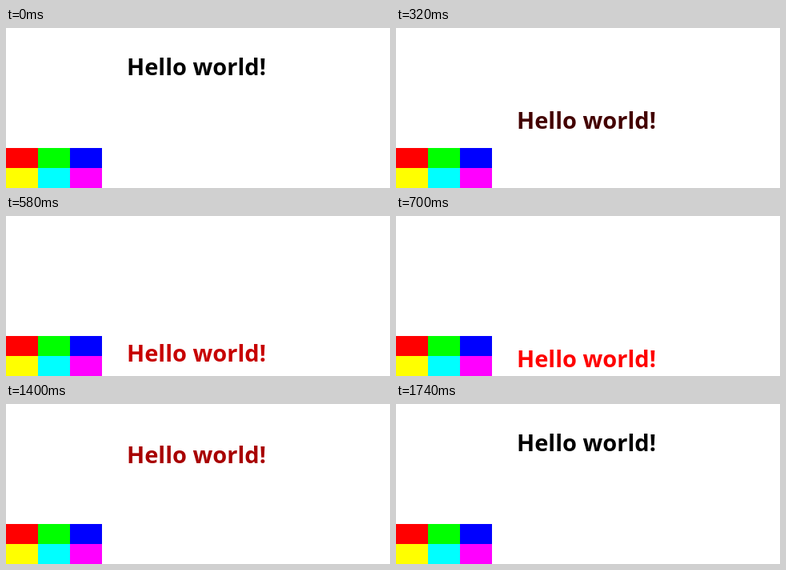
An HTML page with a canvas for the animation above (2.12 s loop, 480x200 px).

```html
<!DOCTYPE html>
<html lang="en">
<head>
<meta charset="utf-8">
<title>Hello world</title>
<style>
html, body { margin: 0; width: 100%; height: 100%; overflow: hidden; background: #fff; }
canvas { display: block; }
</style>
</head>
<body>
<canvas id="stage" width="480" height="200"></canvas>
<script>
const ctx = document.getElementById('stage').getContext('2d');
const LOOP = 2120, STEP = 20, DURATION = 500;
const FALL = 200, RISE = 1240;
const TOP = 59, DROP = 130;
const SWATCHES = ['#f00', '#0f0', '#00f', '#ff0', '#0ff', '#f0f'];

function bounceOut(p) {
  const n = 7.5625, d = 2.75;
  if (p < 1 / d) return n * p * p;
  if (p < 2 / d) return n * (p - 1.5 / d) ** 2 + 0.75;
  if (p < 2.5 / d) return n * (p - 2.25 / d) ** 2 + 0.9375;
  return n * (p - 2.625 / d) ** 2 + 0.984375;
}

// Progress advances in whole steps, sampled mid-step.
function progress(t, start) {
  if (t < start) return 0;
  const step = Math.floor((t - start) / STEP);
  return Math.min(1, (step * STEP + 11) / DURATION);
}

function draw(t) {
  const rising = t >= RISE;
  const p = progress(t, rising ? RISE : FALL);
  const fallen = rising ? 1 - bounceOut(p) : bounceOut(p);
  const red = Math.round(255 * (rising ? 1 - p : p));

  ctx.fillStyle = '#fff';
  ctx.fillRect(0, 0, 480, 200);
  SWATCHES.forEach((color, i) => {
    ctx.fillStyle = color;
    ctx.fillRect(i % 3 * 40, 150 + Math.floor(i / 3) * 25, 40, 25);
  });
  ctx.font = 'bold 29px "Noto Sans", sans-serif';
  ctx.fillStyle = `rgb(${red}, 0, 0)`;
  ctx.fillText('Hello world!', 151, TOP + Math.round(DROP * fallen));
}

function frame() {
  draw(performance.now() % LOOP);
  requestAnimationFrame(frame);
}
frame();
</script>
</body>
</html>
```
